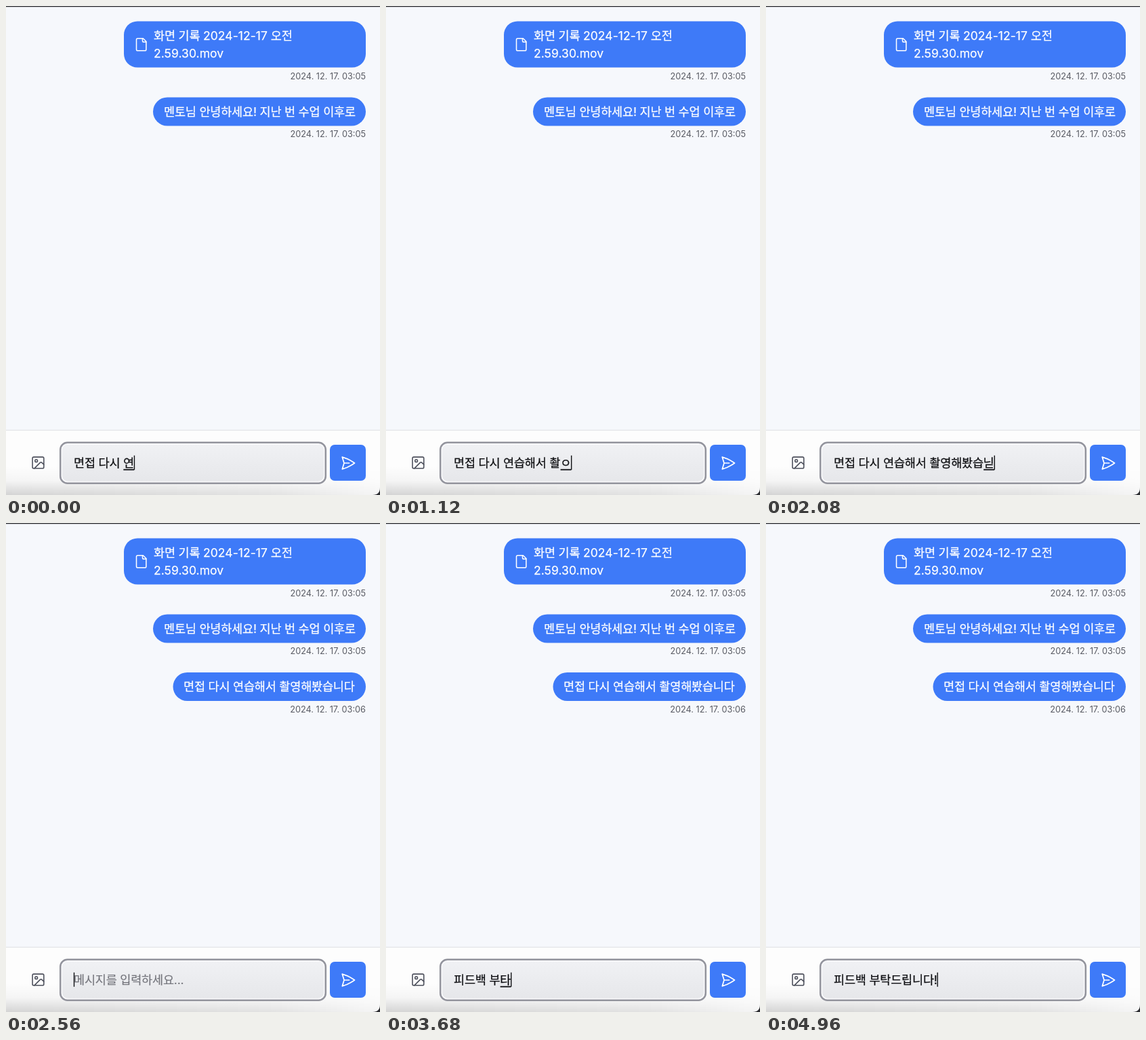
Write an HTML page that moves like this. It is 552 px wide and 720 px high and loops after 5.04 s.

```html
<!DOCTYPE html>
<html lang="ko">
<head>
<meta charset="utf-8">
<title>채팅</title>
<style>
  html, body { margin: 0; width: 100%; height: 100%; overflow: hidden; background: #f6f8fc; }
  svg { display: block; width: 552px; height: 720px; }
  text {
    font: 400 17.5px Inter, "Noto Sans CJK KR", "Noto Sans CJK JP", sans-serif;
    letter-spacing: -.2px;
    white-space: pre;
    stroke-width: .25px;
  }
  .bubble rect, .send rect { fill: #3e7af8; }
  .bubble text { fill: #fff; stroke: #fff; }
  .bubble .latin { letter-spacing: .05px; }
  .bubble .time { font-size: 12.7px; letter-spacing: 0; fill: #595b63; stroke: none; text-anchor: end; }
  .icon { fill: none; stroke-width: 1.7; stroke-linecap: round; stroke-linejoin: round; }
  #draft { fill: #101114; stroke: #101114; }
  #hint { fill: #74757c; stroke: #74757c; stroke-width: .15px; }
</style>
</head>
<body>
<svg viewBox="0 0 552 720">
  <defs>
    <linearGradient id="field" x2="0" y2="1">
      <stop stop-color="#f0f1f4"/><stop offset="1" stop-color="#e6e7ea"/>
    </linearGradient>
    <linearGradient id="shade">
      <stop stop-opacity=".16"/><stop offset=".7" stop-opacity=".11"/><stop offset="1" stop-opacity=".03"/>
    </linearGradient>
    <linearGradient id="rise" x2="0" y2="1">
      <stop stop-color="#000"/><stop offset=".5" stop-color="#333"/><stop offset="1" stop-color="#fff"/>
    </linearGradient>
    <mask id="fade"><rect y="678" width="552" height="42" fill="url(#rise)"/></mask>
  </defs>

  <rect width="552" height="720" fill="#f6f8fc"/>
  <rect width="552" height="1.3" fill="#292a2e"/>

  <g class="bubble">
    <rect x="174" y="22.5" width="357" height="68" rx="20"/>
    <g class="icon" stroke="#fff" transform="translate(188.9 45.9) scale(.9)">
      <path d="M15 2H6a2 2 0 0 0-2 2v16a2 2 0 0 0 2 2h12a2 2 0 0 0 2-2V7Z"/>
      <path d="M14 2v4a2 2 0 0 0 2 2h4"/>
    </g>
    <text x="218" y="49.8">화면 기록 <tspan class="latin">2024-12-17 </tspan>오전</text>
    <text x="218" y="75.8" class="latin">2.59.30.mov</text>
    <text x="531" y="107.9" class="time">2024. 12. 17. 03:05</text>
  </g>
  <g class="bubble">
    <rect x="217" y="134.5" width="314" height="42" rx="21"/>
    <text x="233" y="161.7">멘토님 안녕하세요! 지난 번 수업 이후로</text>
    <text x="531" y="193.3" class="time">2024. 12. 17. 03:05</text>
  </g>
  <g class="bubble" id="sent" visibility="hidden">
    <rect x="246.5" y="220" width="284.5" height="42" rx="21"/>
    <text x="262" y="247.2">면접 다시 연습해서 촬영해봤습니다</text>
    <text x="531" y="278.8" class="time">2024. 12. 17. 03:06</text>
  </g>

  <rect y="625" width="552" height="95" fill="#fdfdfd"/>
  <rect y="624" width="552" height="1.2" fill="#e1e3e7"/>
  <rect y="678" width="552" height="42" fill="url(#shade)" mask="url(#fade)"/>
  <path d="M552 709Q552 720 541 720H552Z" fill="#2b2c30"/>

  <g class="icon" stroke="#4d505c" transform="translate(36.3 661.3) scale(.93)">
    <rect x="3" y="3" width="18" height="18" rx="2"/>
    <circle cx="9" cy="9" r="2"/>
    <path d="M21 15l-3.086-3.086a2 2 0 0 0-2.828 0L6 21"/>
  </g>

  <rect x="80.2" y="642.7" width="391.6" height="60" rx="10.5" fill="#f8f8fa" stroke="#93949d" stroke-width="2.5"/>
  <rect x="83.2" y="645.7" width="385.6" height="54" rx="8" fill="url(#field)"/>

  <g class="send">
    <rect x="478" y="646" width="53" height="53" rx="7"/>
    <path class="icon" stroke="#fff" transform="translate(493 661)"
      d="M6 12L3.27 3.126A59.77 59.77 0 0 1 21.485 12 59.77 59.77 0 0 1 3.27 20.876L6 12zm0 0h7.5"/>
  </g>

  <text id="hint" x="100" y="678.7" visibility="hidden">메시지를 입력하세요...</text>
  <text id="draft" x="100" y="678.7"></text>
  <rect id="under" y="681.8" height="1.8" fill="#101114"/>
  <rect id="caret" y="661.8" width="1.4" height="21" fill="#101114"/>
</svg>

<script>
  const LOOP = 5040, KEY = 80, SEND = 2400;
  const el = id => document.getElementById(id);
  const sent = el('sent'), hint = el('hint'), draft = el('draft'), under = el('under'), caret = el('caret');

  // start time, settled text, then what is being composed, one entry per key press
  const bursts = [
    [0, '면접 다시 ', '연'],
    [160, '면접 다시 연', 'ㅅ,스,습,습ㅎ,습해,습해서,습해서 '],
    [800, '면접 다시 연습해서 ', 'ㅊ,촤,촬'],
    [1120, '면접 다시 연습해서 촬', 'ㅇ,여,영,영ㅎ,영해,영햅,영해봐,영해봤'],
    [1760, '면접 다시 연습해서 촬영해봤', '스,습,습ㄴ,습니,습닏,습니다'],
    [SEND, '', ''],
    [2720, '', 'ㅍ,피,핃,피드,피듭,피드배,피드백,피드백 '],
    [3360, '피드백 ', 'ㅂ,부'],
    [3600, '피드백 ', '붙,부타,부탁'],
    [3920, '피드백 부탁', 'ㄷ,드,드리,드립'],
    [4320, '피드백 부탁드립', 'ㄴ,니,닏,니다'],
    [4880, '피드백 부탁드립니다', '!']
  ];
  const steps = bursts.flatMap(([at, head, tails]) =>
    tails.split(',').map((tail, i) => [at + i * KEY, head + tail]));

  const show = (node, on) => node.setAttribute('visibility', on ? 'visible' : 'hidden');
  let shown = null;

  function type(text) {
    if (text === shown) return;
    shown = text;
    draft.textContent = text;
    const last = text.length - 1;
    const end = text ? draft.getEndPositionOfChar(last).x : 100;
    const composing = /[ㄱ-ㅎ가-힣]$/.test(text);
    if (composing) {
      const start = draft.getStartPositionOfChar(last).x;
      under.setAttribute('x', start + .3);
      under.setAttribute('width', end - start);
    }
    show(under, composing);
    show(hint, !text);
    caret.setAttribute('x', end - .2);
  }

  function render(t) {
    show(sent, t >= SEND);
    let text = '';
    for (const [at, value] of steps) if (at <= t) text = value;
    type(text);
  }

  const start = performance.now();
  function frame() {
    render((performance.now() - start) % LOOP);
    requestAnimationFrame(frame);
  }
  frame();
</script>
</body>
</html>
```
